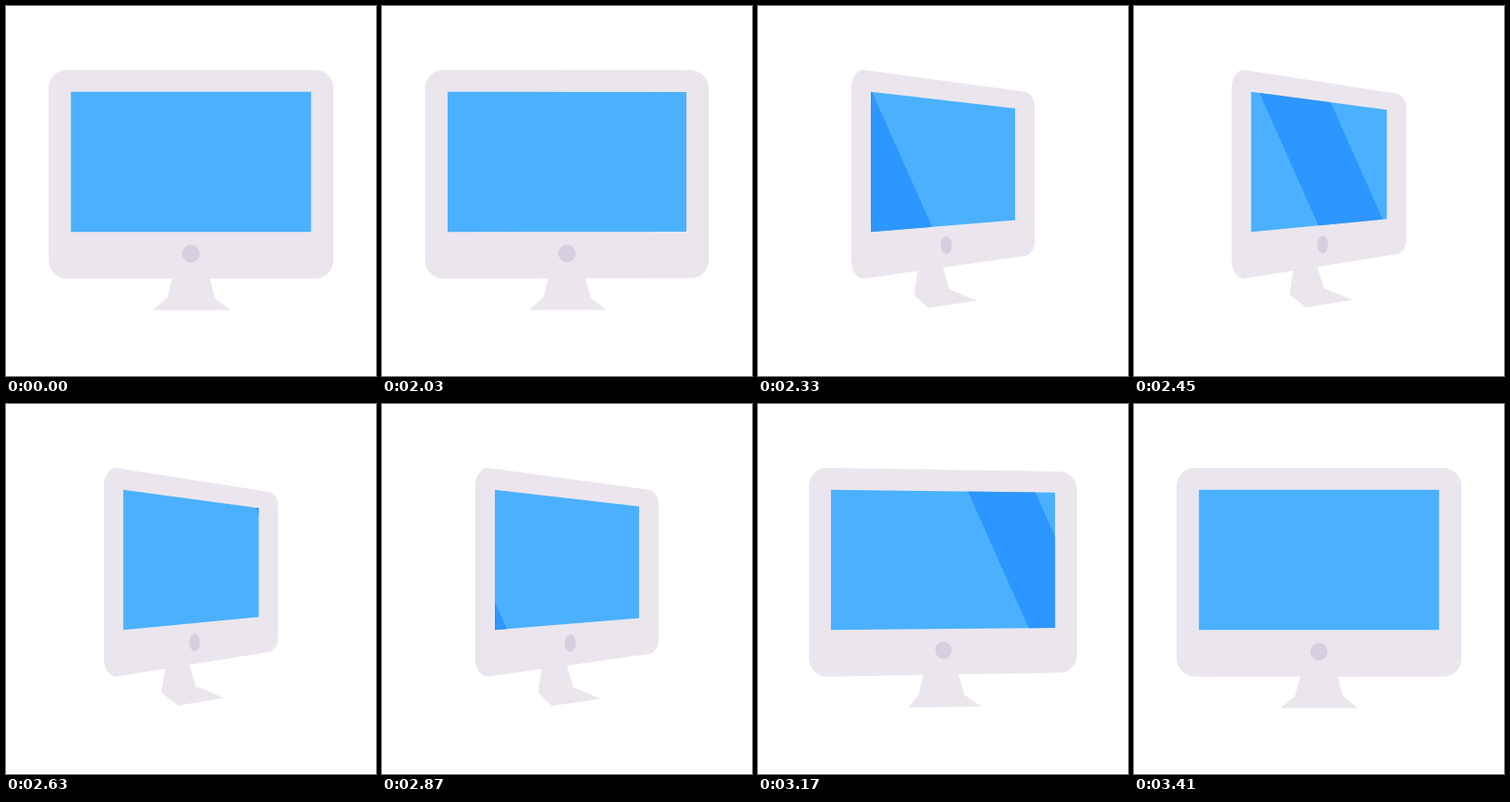
These frames come from a looping animation (400x400 px, 3650 ms). An HTML page:

```html
<!DOCTYPE html>
<html>
<head>
<meta charset="utf-8">
<title>Turning monitor</title>
<style>
  html, body { margin: 0; width: 100%; height: 100%; overflow: hidden; background: #fff; }
  svg { display: block; width: 100%; height: 100%; }
</style>
</head>
<body>
<svg viewBox="0 0 400 400">
  <clipPath id="glass"><polygon id="glassShape"/></clipPath>
  <g fill="#ebe6ed">
    <polygon id="stand"/>
    <path id="body"/>
  </g>
  <polygon id="screen" fill="#4bb1ff"/>
  <g clip-path="url(#glass)"><polygon id="shine" fill="#2e96ff"/></g>
  <ellipse id="button" ry="9.5" fill="#d5cfde"/>
</svg>
<script>
const LOOP = 3650, START = 2030, END = 3410, STEP = 30;
const el = id => document.getElementById(id);
const set = (id, attrs) => {
  for (const key in attrs) el(id).setAttribute(key, attrs[key]);
};
const clamp = x => Math.min(1, Math.max(0, x));
const mix = (a, b, p) => a + (b - a) * p;

// Symmetric cubic ease with long, slow ends
function ease(x) {
  x = clamp(x);
  let lo = 0, hi = 1;
  for (let i = 0; i < 24; i++) {
    const s = (lo + hi) / 2, r = 1 - s;
    if (3 * r * r * s * 0.82 + 3 * r * s * s * 0.18 + s ** 3 < x) lo = s;
    else hi = s;
  }
  return lo * lo * (3 - 2 * lo);
}

const standFront = [[181, 290], [219, 290], [226, 316], [242, 328.7], [158, 328.7], [174, 316]];
const standTurned = [[173, 280], [197.5, 280], [205, 305], [236, 317.7], [186, 326], [168, 312]];

// Rounded corner from a to b around corner c
function corner(a, c, b) {
  const toward = q => q.map((v, i) => mix(v, c[i], 0.55));
  return `L${a}C${toward(a)} ${toward(b)} ${b}`;
}

function bodyPath(p) {
  const L = 46 + 60 * p, R = 354 - 60 * p;
  const l = L + 20 - 7 * p, r = R - 20 + 10 * p;
  const top = 69 + 26 * p, bottom = 294.7 - 26.7 * p, ry = 20 - 4 * p;
  return ('M' + [l, 69] +
    corner([r, top], [R, top + 1.5 * p], [R, top + ry]) +
    corner([R, bottom - ry], [R, bottom - 1.5 * p], [r, bottom]) +
    corner([l, 294.7], [L, 294.7], [L, 274.7]) +
    corner([L, 89], [L, 69], [l, 69]) + 'Z');
}

// Front edge of the light band, measured at the bottom of the screen
const shineX = t => t < 2750 ? 190.6 + (t - 2330) * 0.702 : 135.5 + (t - 2870) * 0.768;

function draw(time) {
  const t = START + STEP * Math.floor((time - START) / STEP);
  const moving = t >= START && t < END;
  const p = moving ? ease((t - 1950) / 560) - ease((t - 2545) / 1015) : 0;

  set('body', { d: bodyPath(p) });
  set('stand', {
    points: standFront.map((a, i) => a.map((v, k) => mix(v, standTurned[i][k], p))).join(' ')
  });

  const left = 70.2 + 56.8 * p, right = 329.8 - 56.8 * p;
  const points = [[left, 92.7], [right, 92.7 + 19.8 * p], [right, 244.2 - 14 * p], [left, 244.2]].join(' ');
  set('screen', { points });
  set('glassShape', { points });
  set('button', { cx: 200 + 4 * p, cy: 267.7 - 10 * p, rx: 9.5 - 3.7 * p });

  const x = moving ? shineX(t) : -200, lean = 0.445 * 154, width = 72.5;
  set('shine', {
    points: [[x - lean, 90], [x, 244], [x + 0.9, 246], [x + 0.9 - width, 246], [x - lean - width, 90]].join(' ')
  });
}

const begin = performance.now();
function tick() {
  draw((performance.now() - begin) % LOOP);
  requestAnimationFrame(tick);
}
tick();
</script>
</body>
</html>
```
